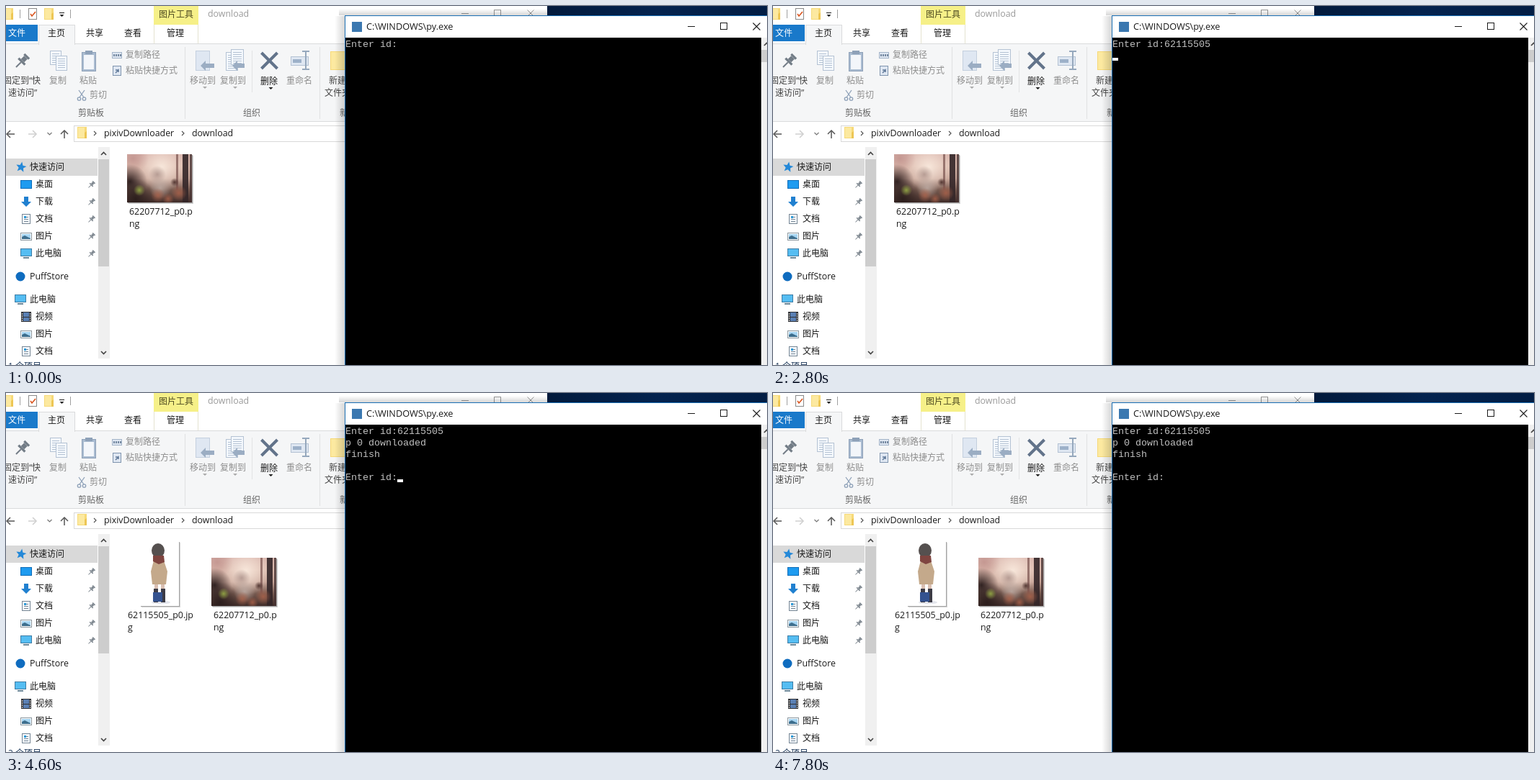
An HTML page with a canvas that plays this animation: 1056 by 499 pixels, repeating every 8 s.

```html
<!DOCTYPE html>
<html lang="zh-CN">
<head>
<meta charset="utf-8">
<title>Downloader</title>
<style>
html, body { margin: 0; width: 100%; height: 100%; overflow: hidden; background: #fff; }
canvas { display: block; }
</style>
</head>
<body>
<canvas id="stage" width="1056" height="499"></canvas>
<script>
const c = document.getElementById('stage').getContext('2d');
const LOOP = 8000;
const CJK = "12px 'Open Sans','Noto Sans CJK SC','Noto Sans CJK',sans-serif";
const LATIN = "12.4px 'Open Sans','Noto Sans',sans-serif";
const TITLE = "12.7px 'Open Sans','Noto Sans',sans-serif";
const MONO = "13.333px 'Liberation Mono','Noto Sans Mono',monospace";
const INK = '#1a1a1a', DIM = '#8d8d8d', BLUE = '#1979ca';

// Moments of the session, in ms
const PASTE = 800, ENTER = 1400, SAVED = 3500, FINISH = 3800, LISTED = 4600;
const CURSOR_ON = [[300, 1100], [1400, 2100], [2500, 3200], [3500, 4200],
                   [4600, 5300], [5700, 6400], [6700, 7400]];

function box(x, y, w, h, fill) {
  c.fillStyle = fill;
  c.fillRect(x, y, w, h);
}

function frame(x, y, w, h, color, fill) {
  if (fill) box(x, y, w, h, fill);
  c.strokeStyle = color;
  c.lineWidth = 1;
  c.strokeRect(x + .5, y + .5, w - 1, h - 1);
}

// y is the middle of the line
function text(s, x, y, color = INK, font = CJK, align = 'left') {
  c.font = font;
  c.fillStyle = color;
  c.textAlign = align;
  c.fillText(s, x, y + 4);
}

const label = (s, x, y, color = DIM) => text(s, x, y, color, CJK, 'center');

function line(color, width, ...p) {
  c.strokeStyle = color;
  c.lineWidth = width;
  c.beginPath();
  for (let i = 0; i < p.length; i += 2) c.lineTo(p[i], p[i + 1]);
  c.stroke();
}

function poly(color, ...p) {
  c.fillStyle = color;
  c.beginPath();
  for (let i = 0; i < p.length; i += 2) c.lineTo(p[i], p[i + 1]);
  c.fill();
}

function oval(x, y, rx, ry, color) {
  c.fillStyle = color;
  c.beginPath();
  c.ellipse(x, y, rx, ry, 0, 0, Math.PI * 2);
  c.fill();
}

function cross(x, y, r, color, width) {
  line(color, width, x - r, y - r, x + r, y + r);
  line(color, width, x + r, y - r, x - r, y + r);
}

function fade(x0, y0, x1, y1, ...stops) {
  const g = c.createLinearGradient(x0, y0, x1, y1);
  stops.forEach((s, i) => g.addColorStop(i / (stops.length - 1), s));
  return g;
}

// Soft round patch; rgb is "r,g,b"
function glow(x, y, r, rgb, alpha) {
  const g = c.createRadialGradient(x, y, 0, x, y, r);
  g.addColorStop(0, `rgba(${rgb},${alpha})`);
  g.addColorStop(1, `rgba(${rgb},0)`);
  box(x - r, y - r, r * 2, r * 2, g);
}

const caret = (x, y, color) => poly(color, x - 3, y, x + 3, y, x, y + 3);

function folder(x, y, w, h) {
  box(x, y, w, h, '#f6d978');
  box(x + 1, y + 1, w - 4, h - 2, '#fce9a0');
  poly('#edc654', x + w - 3, y + h, x + w - 3, y + h / 2, x + w, y + h / 2 - 2, x + w, y + h);
}

function pin(x, y, k, color) {
  c.save();
  c.translate(x, y);
  c.rotate(Math.PI / 4);
  c.scale(k, k);
  box(-3, -6, 6, 2, color);
  box(-2, -4, 4, 4, color);
  box(-4, 0, 8, 2, color);
  box(-.6, 2, 1.2, 6, color);
  c.restore();
}

function page(x, y, w, h, ink) {
  frame(x, y, w, h, ink, '#f4f8fd');
  for (let i = y + 4; i < y + h - 2; i += 3) box(x + 3, i, w - 6, 1, ink);
}

function titleBar() {
  folder(-4, 3, 14, 16);
  box(19, 5, 1, 12, '#a0a0a0');
  frame(31, 3, 12, 16, '#8a8a8a', '#fff');
  line('#d9541e', 1.6, 34, 11, 36, 14, 41, 8);
  folder(53, 3, 13, 16);
  box(74, 9, 7, 1, INK);
  caret(77.5, 12, INK);
  box(89, 5, 1, 12, '#a0a0a0');
  box(205, 0, 62, 26, '#f6f088');
  label('图片工具', 236, 12, '#4d4a20');
  text('download', 280, 11, '#9a9a9a', LATIN);
  box(632, 10, 10, 1, '#999');
  frame(677, 5, 10, 10, '#999');
  cross(728, 10, 4.5, '#999', 1);
}

function tabs() {
  box(0, 26, 44, 23, BLUE);
  text('文件', 3, 38, '#fff');
  box(0, 52, 751, 109, '#f5f6f7');
  box(0, 52, 751, 1, '#dadbdc');
  box(0, 160, 751, 1, '#dadbdc');
  frame(45, 26, 51, 28, '#dadbdc', '#f5f6f7');
  box(46, 52, 49, 3, '#f5f6f7');
  box(205, 26, 1, 26, '#e4e3d0');
  box(266, 26, 1, 26, '#e4e3d0');
  label('主页', 70, 38, INK);
  label('共享', 123, 38, INK);
  label('查看', 176, 38, INK);
  label('管理', 235, 38, INK);
}

function ribbon() {
  const pale = '#b4c2d3', face = '#dfe7f2', steel = '#8ea1b8';
  pin(23, 76, 1.6, '#737d87');
  label('固定到“快', 22, 104, '#444');
  label('速访问”', 23, 121, '#444');

  page(61, 62, 16, 20, pale);
  page(69, 69, 16, 21, pale);
  label('复制', 72, 104);

  frame(105, 64, 20, 27, steel, '#a9bbd0');
  box(108, 68, 14, 20, '#f3f6fa');
  box(110, 62, 10, 5, steel);
  label('粘贴', 114, 104);

  frame(147, 64, 14, 9, '#a3b4c8', face);
  for (let i = 0; i < 4; i++) box(149 + i * 3, 67, 2, 3, '#7488a0');
  text('复制路径', 166, 68, DIM);
  frame(148, 83, 12, 14, '#7f94ae', face);
  line('#5f7898', 1.5, 152, 93, 156, 89, 156, 92);
  line('#5f7898', 1.5, 152, 89, 156, 89);
  text('粘贴快捷方式', 166, 90, DIM);

  line(steel, 1.3, 101, 117, 108, 127);
  line(steel, 1.3, 109, 117, 102, 127);
  for (const x of [101.5, 108.5]) {
    c.beginPath();
    c.arc(x, 129, 2.2, 0, 7);
    c.stroke();
  }
  text('剪切', 116, 124, DIM);
  label('剪贴板', 118, 149, '#666');

  frame(263, 62, 20, 28, '#c3cfde', face);
  poly('#9badc3', 270, 83, 277, 76, 277, 80, 289, 80, 289, 86, 277, 86, 277, 90);
  label('移动到', 273, 104);
  caret(276, 112, '#aaa');
  page(305, 64, 17, 26, pale);
  page(312, 60, 18, 22, pale);
  poly('#9badc3', 314, 83, 321, 76, 321, 80, 331, 80, 331, 86, 321, 86, 321, 90);
  label('复制到', 315, 104);
  caret(318, 112, '#aaa');
  box(341, 62, 1, 58, '#e2e3e4');

  cross(365.5, 76, 11, '#62738a', 4);
  label('删除', 365, 105, INK);
  caret(367.5, 113, INK);
  frame(395, 70, 25, 13, pale, face);
  box(398, 74, 12, 5, '#9db1c9');
  line('#96a8bd', 2, 411, 63, 421, 63);
  line('#96a8bd', 2, 416, 63, 416, 88);
  line('#96a8bd', 2, 411, 88, 421, 88);
  label('重命名', 407, 104);
  label('组织', 341, 149, '#666');

  folder(450, 63, 24, 26);
  text('新建', 448, 104, '#444');
  text('文件夹', 442, 121, '#444');
  text('新建', 463, 149, '#666');
  box(248, 57, 1, 100, '#e0e1e2');
  box(435, 57, 1, 100, '#e0e1e2');
}

function arrow(x, y, color) {
  line(color, 1.5, x + 12, y, x + 1, y);
  line(color, 1.5, x + 6, y - 5, x + 1, y, x + 6, y + 5);
}

function addressBar() {
  arrow(0, 178, '#555');
  line('#cfcfcf', 1.5, 31, 178, 42, 178);
  line('#cfcfcf', 1.5, 37, 173, 42, 178, 37, 183);
  line('#777', 1.2, 57.5, 176, 60.5, 179, 63.5, 176);
  line('#555', 1.5, 81, 184, 81, 173);
  line('#555', 1.5, 76, 178, 81, 173, 86, 178);
  frame(94, 166, 640, 23, '#d9d9d9');
  folder(99, 168, 13, 16);
  for (const x of [122, 244]) line('#555', 1.2, x, 174, x + 3, 177, x, 180);
  text('pixivDownloader', 136, 177, INK, LATIN);
  text('download', 258, 177, INK, LATIN);
}

const icons = {
  desktop(x, y) { frame(x, y - 6, 16, 12, '#0d6cb8', '#1e9bf0'); },
  download(x, y) {
    poly('#2080d0', x + 5, y - 7, x + 11, y - 7, x + 11, y, x + 15, y,
         x + 8, y + 7, x + 1, y, x + 5, y);
  },
  doc(x, y) {
    page(x + 2, y - 7, 12, 14, '#768694');
    box(x + 5, y - 4, 3, 3, '#2f9bd8');
  },
  picture(x, y) {
    frame(x, y - 5, 16, 11, '#8b979f', '#fff');
    box(x + 2, y - 3, 12, 7, '#a6d5f2');
    poly('#3d6e8d', x + 2, y + 4, x + 2, y + 1, x + 6, y - 1, x + 14, y + 3, x + 14, y + 4);
  },
  pc(x, y) {
    frame(x, y - 7, 16, 11, '#3d7ca5', '#55bdf2');
    box(x + 4, y + 5, 8, 2, '#6b8799');
  },
  video(x, y) {
    box(x + 1, y - 7, 14, 14, '#303236');
    box(x + 4, y - 6, 8, 12, '#5a80b4');
    box(x + 4, y, 8, 1, '#303236');
    for (let i = -5; i < 6; i += 3) {
      box(x + 2, y + i, 1, 2, '#ddd');
      box(x + 13, y + i, 1, 2, '#ddd');
    }
  }
};

function star(x, y, r, color) {
  const p = [];
  for (let i = 0; i < 10; i++) {
    const a = i * Math.PI / 5 - 1.4, d = i % 2 ? r * .45 : r;
    p.push(x + d * Math.cos(a), y + d * Math.sin(a));
  }
  poly(color, ...p);
}

function sidebar(count) {
  box(0, 212, 127, 24, '#d9d9d9');
  star(21, 224, 7.5, '#2589d8');
  text('快速访问', 33, 224);
  const quick = [['desktop', '桌面'], ['download', '下载'], ['doc', '文档'],
                 ['picture', '图片'], ['pc', '此电脑']];
  quick.forEach(([icon, name], i) => {
    const y = 248 + i * 24;
    icons[icon](20, y);
    text(name, 41, y);
    pin(119, y, .8, '#7f8890');
  });
  oval(20, 376, 6.5, 6.5, '#0f6cbf');
  text('PuffStore', 33, 376, INK, LATIN);
  icons.pc(12, 408);
  text('此电脑', 33, 408);
  [['video', '视频'], ['picture', '图片'], ['doc', '文档']].forEach(([icon, name], i) => {
    icons[icon](20, 432 + i * 24);
    text(name, 41, 432 + i * 24);
  });
  box(128, 196, 16, 294, '#f0f0f0');
  box(128, 213, 15, 149, '#cdcdcd');
  line('#444', 1.6, 132, 207, 135.5, 203.5, 139, 207);
  line('#444', 1.6, 132, 480, 135.5, 483.5, 139, 480);
  text(count + ' 个项目', 3, 501, '#1e395b');
}

function shadow(x, y, w, h) {
  box(x + 2, y + 2, w, h, '#d2d2d2');
  box(x + 1, y + 1, w, h, '#a5a5a5');
}

function forest(x, y) {
  shadow(x, y, 90, 67);
  c.save();
  c.beginPath();
  c.rect(x, y, 90, 67);
  c.clip();
  c.translate(x, y);
  box(0, 0, 90, 67, fade(0, 0, 0, 67, '#d8b4ac', '#dcbbae', '#c9a699', '#75594f', '#402c29'));
  glow(48, 18, 34, '252,238,226', .85);
  glow(8, 6, 22, '176,122,120', .5);
  glow(42, 28, 12, '150,122,116', .6);
  glow(4, 38, 24, '42,28,28', .95);
  glow(12, 62, 28, '40,27,26', .9);
  glow(46, 47, 15, '190,172,164', .8);
  box(68, 0, 3, 50, 'rgba(120,82,78,.7)');
  box(77, 0, 8, 67, 'rgba(52,38,40,.9)');
  box(87, 0, 3, 67, 'rgba(70,50,50,.8)');
  glow(17, 50, 8, '150,170,70', .9);
  glow(66, 39, 6, '70,42,38', .9);
  for (const [px, py, r] of [[43, 57, 10], [72, 54, 11], [57, 62, 8]]) glow(px, py, r, '172,98,74', .8);
  c.restore();
}

function figure(x, y) {
  shadow(x, y, 54, 90);
  box(x, y, 54, 90, '#fff');
  c.save();
  c.translate(x, y);
  oval(29, 85, 13, 2.5, '#e3e5ec');
  box(20, 57, 5, 10, '#d9bfb2');
  box(29, 57, 5, 10, '#d9bfb2');
  box(19, 66, 6, 19, '#3c3b45');
  box(29, 66, 6, 19, '#3c3b45');
  poly('#c4a98b', 19, 27, 33, 27, 38, 42, 36, 60, 17, 60, 15, 42);
  oval(25, 13, 9, 10, '#55504f');
  poly('#7f4540', 18, 20, 33, 20, 34, 29, 26, 32, 18, 28);
  box(18, 71, 13, 13, '#34528f');
  c.restore();
}

function files(listed) {
  const dx = listed ? 117 : 0, dy = listed ? 23 : 0;
  if (listed) {
    figure(186, 206);
    text('62115505_p0.jp', 169, 309, INK, LATIN);
    text('g', 169, 326, INK, LATIN);
  }
  forest(168 + dx, 206 + dy);
  text('62207712_p0.p', 171 + dx, 286 + dy, INK, LATIN);
  text('ng', 171 + dx, 303 + dy, INK, LATIN);
}

function consoleWindow(t) {
  box(751, 0, 305, 14, fade(751, 0, 1056, 0, '#021a3c', '#04234f', '#021d44'));
  box(456, 14, 14, 485, fade(456, 0, 470, 0, 'rgba(0,0,0,0)', 'rgba(0,0,0,.16)'));
  box(462, 4, 289, 9, fade(0, 4, 0, 13, 'rgba(0,0,0,0)', 'rgba(0,0,0,.16)'));
  box(470, 13, 586, 486, '#1b6fb5');
  box(471, 14, 585, 30, '#fff');
  box(480, 22, 14, 14, '#3b78b0');
  text('C:\\WINDOWS\\py.exe', 500, 29, INK, TITLE);
  box(946, 28, 10, 1, INK);
  frame(991, 23, 10, 10, INK);
  cross(1041.5, 28.5, 5, INK, 1.1);
  box(471, 44, 577, 455, '#000');
  box(1048, 44, 8, 455, '#f0f0f0');
  box(1048, 61, 8, 17, '#cdcdcd');
  line('#444', 1.6, 1052, 55, 1055.5, 51.5, 1059, 55);

  const rows = [t < PASTE ? 'Enter id:' : 'Enter id:62115505'];
  if (t >= ENTER) rows.push('');
  if (t >= SAVED) rows.splice(1, 1, 'p 0 downloaded', '');
  if (t >= FINISH) rows.splice(2, 1, 'finish', '', 'Enter id:');
  rows.forEach((s, i) => text(s, 471, 53 + i * 16, '#c0c0c0', MONO));

  if (CURSOR_ON.some(([a, b]) => t >= a && t < b)) {
    const last = rows.length - 1;
    box(471 + rows[last].length * 8, 56 + last * 16, 8, 4, '#fff');
  }
}

function draw(t) {
  const listed = t >= LISTED;
  box(0, 0, 1056, 499, '#fff');
  titleBar();
  tabs();
  ribbon();
  addressBar();
  sidebar(listed ? 2 : 1);
  files(listed);
  consoleWindow(t);
}

const start = performance.now();
function tick() {
  draw((performance.now() - start) % LOOP);
  requestAnimationFrame(tick);
}
tick();
</script>
</body>
</html>
```
